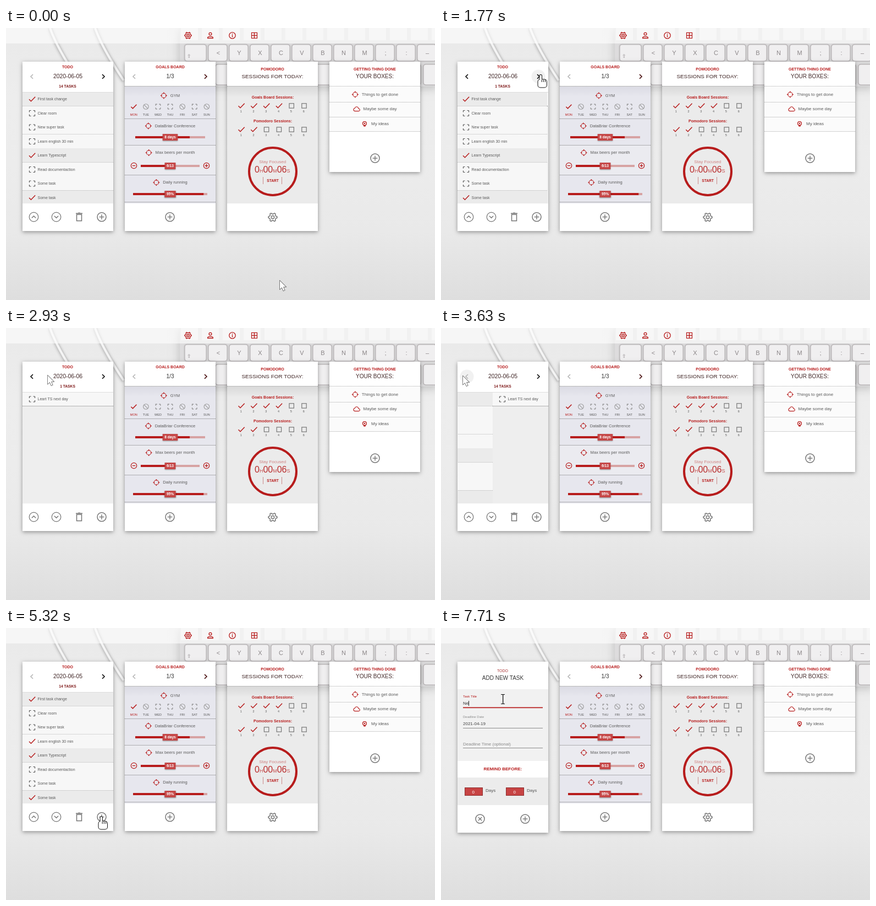
An HTML page with a canvas that plays this animation: 780 by 493 pixels, repeating every 8 s.

```html
<!DOCTYPE html>
<html lang="en">
<head>
<meta charset="utf-8">
<title>Productivity board</title>
<style>
html, body { margin: 0; width: 100%; height: 100%; overflow: hidden; background: #e8e8e8; }
canvas { display: block; width: 780px; height: 493px; }
</style>
</head>
<body>
<canvas id="stage" width="780" height="493"></canvas>
<script>
const ctx = document.getElementById('stage').getContext('2d');
const LOOP = 8000, FORM_AT = 5540, NEXT_AT = 1690, BACK_AT = 3310, FOCUS_AT = 6320;
const RED = '#b71c1c', GREY = '#757575', DARK = '#333', TEXT = '#5a5a5a', FAINT = '#b8b8b8';
const FONT = '"Liberation Sans", Arial, sans-serif';

const clamp = v => Math.max(0, Math.min(1, v));
const easeInOut = p => p < .5 ? 4 * p ** 3 : 1 - (2 - 2 * p) ** 3 / 2;
const progress = (t, start, length) => easeInOut(clamp((t - start) / length));
const mix = (a, b, p) => a + (b - a) * p;

// ---- drawing helpers ----
function rect(x, y, w, h, color) {
  ctx.fillStyle = color;
  ctx.fillRect(x, y, w, h);
}
function box(x, y, r, color, width = 1.2) {
  ctx.strokeStyle = color;
  ctx.lineWidth = width;
  ctx.strokeRect(x - r, y - r, 2 * r, 2 * r);
}
function textWidth(str, size, weight = '') {
  ctx.font = `${weight} ${size}px ${FONT}`;
  return ctx.measureText(str).width;
}
function text(str, x, y, size, color = TEXT, align = 'left', weight = '') {
  ctx.font = `${weight} ${size}px ${FONT}`;
  ctx.fillStyle = color;
  ctx.textAlign = align;
  ctx.fillText(str, x, y);
}
const centered = (str, x, y, size, color, weight) => text(str, x, y, size, color, 'center', weight);

// points: x,y pairs relative to (x, y)
function line(x, y, points, color, width = 1.3, close = false) {
  ctx.beginPath();
  for (let i = 0; i < points.length; i += 2) ctx.lineTo(x + points[i], y + points[i + 1]);
  if (close) ctx.closePath();
  ctx.strokeStyle = color;
  ctx.lineWidth = width;
  ctx.stroke();
}
function ring(x, y, r, color, width = 1.3) {
  ctx.beginPath();
  ctx.arc(x, y, r, 0, Math.PI * 2);
  ctx.strokeStyle = color;
  ctx.lineWidth = width;
  ctx.stroke();
}
function disc(x, y, r, color) {
  ctx.beginPath();
  ctx.arc(x, y, r, 0, Math.PI * 2);
  ctx.fillStyle = color;
  ctx.fill();
}
function dotted(x, y, color = '#757575') {
  ctx.setLineDash([1, 1]);
  line(x, y + .5, [0, 0, 165, 0], color, 1);
  ctx.setLineDash([]);
}
function shadowed(blur, dy, alpha, draw) {
  ctx.save();
  ctx.shadowColor = `rgba(0,0,0,${alpha})`;
  ctx.shadowBlur = blur;
  ctx.shadowOffsetY = dy;
  draw();
  ctx.restore();
}
function fade(x, y, w, h, ...colors) {
  const g = ctx.createLinearGradient(0, y, 0, y + h);
  colors.forEach((c, i) => g.addColorStop(i / (colors.length - 1), c));
  rect(x, y, w, h, g);
}
const card = (x, h) => shadowed(7, 2, .38, () => rect(x, 61, 165, h, '#fff'));

// ---- icons ----
const check = (x, y, s = 1) => line(x, y, [-5.5 * s, .2, -2 * s, 3.7 * s, 5.7 * s, -4.2 * s], RED, 1.5);
const chevron = (x, y, dir, color) => line(x, y, [-2 * dir, -3.8, 2 * dir, 0, -2 * dir, 3.8], color, 1.6);
function plus(x, y, r, color) {
  line(x, y, [-r, 0, r, 0], color, 1.4);
  line(x, y, [0, -r, 0, r], color, 1.4);
}
function brackets(x, y, r, color) {
  ctx.setLineDash([r * .6, r * .8, r * .6, 0]);
  box(x, y, r, color);
  ctx.setLineDash([]);
}
function block(x, y) {
  ring(x, y, 4.8, '#9a9a9a', 1.1);
  line(x, y, [-3.3, -3.3, 3.3, 3.3], '#9a9a9a', 1.1);
}
function button(x, y, r = 8, color = GREY) {
  ring(x, y, r, color, r > 6 ? 1.5 : 1.2);
  plus(x, y, r * .55, color);
}
function arrowButton(x, y, dir) {
  ring(x, y, 8.3, GREY, 1.2);
  line(x, y, [-3.6, -1.8 * dir, 0, 1.8 * dir, 3.6, -1.8 * dir], GREY, 1.4);
}
function target(x, y) {
  ring(x, y, 4.2, RED, 1.1);
  for (let i = 0; i < 4; i++) {
    const c = Math.cos(i * Math.PI / 2), s = Math.sin(i * Math.PI / 2);
    line(x, y, [3.2 * c, 3.2 * s, 6 * c, 6 * s], RED, 1.2);
  }
}
function gear(x, y, r, color) {
  const pts = [];
  for (let i = 0; i < 24; i++) {
    const a = (i - .5) * Math.PI / 12, d = i % 4 < 2 ? r * .74 : r;
    pts.push(d * Math.sin(a), d * Math.cos(a));
  }
  line(x, y, pts, color, 1.5, true);
  ring(x, y, r * .34, color, 1.4);
}
function trash(x, y) {
  line(x, y, [-4.5, -4.5, -4.5, 7, 4.5, 7, 4.5, -4.5], GREY, 1.5, true);
  rect(x - 6, y - 7.2, 12, 1.5, GREY);
  rect(x - 2, y - 8, 4, 1, GREY);
}
function cloud(x, y) {
  ctx.beginPath();
  ctx.arc(x - 3, y + 1, 2.6, Math.PI * .5, Math.PI * 1.45);
  ctx.arc(x, y - .8, 3.4, Math.PI * 1.1, Math.PI * 1.9);
  ctx.arc(x + 3.6, y + 1.4, 2.2, Math.PI * 1.45, Math.PI * .5);
  ctx.closePath();
  ctx.strokeStyle = RED;
  ctx.lineWidth = 1.1;
  ctx.stroke();
}
function bulb(x, y) {
  ring(x, y - 1, 3.4, RED, 1.3);
  disc(x, y - 1, 1.3, RED);
  rect(x - 1.8, y + 2.2, 3.6, 2.3, RED);
}
function labelled(icon, label, cx, y, size) {
  const left = cx - (textWidth(label, size) + 18) / 2;
  icon(left + 6, y);
  text(label, left + 18, y + 2.2, size);
}

// ---- backdrop ----
function key(x, y, w, h, label = '') {
  shadowed(3, 0, .3, () => {
    ctx.beginPath();
    ctx.roundRect(x, y, w, h, 4);
    ctx.fillStyle = '#f0eff0';
    ctx.fill();
  });
  ctx.strokeStyle = '#b3aeb0';
  ctx.lineWidth = 1;
  ctx.stroke();
  centered(label, x + w / 2 + 1, y + h / 2 + 4, 11, '#8a8587');
}
function cable(x) {
  for (const [color, width] of [['#d4d4d4', 8], ['#f4f4f4', 4]]) {
    ctx.beginPath();
    ctx.moveTo(x, 0);
    ctx.quadraticCurveTo(x + 12, 35, x + 52, 95);
    ctx.strokeStyle = color;
    ctx.lineWidth = width;
    shadowed(5, 1, .12, () => ctx.stroke());
  }
}
function backdrop() {
  fade(0, 0, 780, 493, '#e9e9e9', '#ededed', '#ececec', '#e9e9e9', '#dedede');
  cable(80);
  cable(162);

  shadowed(16, 3, .2, () => rect(316, 0, 470, 106, '#dddcdd'));
  for (let i = 0; i < 13; i++) rect(318 + i * 38, 0, 31, 22, '#ececec');
  key(325, 30, 39, 30);
  text('⇧', 329, 54, 9, '#8a8587');
  [...'<YXCVBNM;:–'].forEach((c, i) => key(368 + i * 38, 30, 34, 30, c));
  key(325, 66, 50, 37);
  key(381, 66, 36, 37);
  key(424, 66, 284, 37);
  for (const x of [716, 759]) key(x, 66, 38, 37);
  rect(0, 0, 780, 28, 'rgba(255,255,255,.6)');

  gear(331, 13.5, 6, RED);
  ring(371.5, 10.8, 2.4, RED);
  line(371.5, 17.5, [-4.8, 1, -4.8, -.7, -2.5, -1.8, 2.5, -1.8, 4.8, -.7, 4.8, 1], RED, 1.3, true);
  ring(411.5, 13.5, 5.7, RED);
  rect(410.8, 12.6, 1.4, 4, RED);
  rect(410.8, 10.2, 1.4, 1.5, RED);
  box(451.5, 13.5, 5, RED);
  plus(451.5, 13.5, 5, RED);
}

// ---- todo card ----
// a leading * marks a finished task
const tasks = ['*First task change', 'Clear room', 'New super task', 'Learn english 30 min',
  '*Learn Typescript', 'Read documentaction', 'Some task', '*Some task'];
const TOGGLED = 3;

function row(x, i, label, ticked) {
  const y = 116 + i * 25.5, finished = label[0] === '*';
  rect(x, y, 165, 25.5, finished ? '#ebebeb' : '#f7f7f7');
  dotted(x, Math.round(y + 25));
  if (finished || ticked) check(x + 17.5, y + 13); else brackets(x + 17.5, y + 13, 5, '#555');
  text(label.replace('*', ''), x + 27.5, y + 15.2, 7);
}
function dayArrow(x, dir, color, [px, py]) {
  if (Math.abs(px - x) < 12 && Math.abs(py - 84) < 10) disc(x, 88, 12.5, '#f1f1f1');
  chevron(x, 88, dir, color);
}
function todo(t, at) {
  const next = t >= NEXT_AT && t < BACK_AT;
  const slide = progress(t, NEXT_AT - 15, 700) - progress(t, BACK_AT, 700);
  const shift = Math.round(slide * 165);
  card(30, 307);
  centered('TODO', 112, 73, 7, RED, 'bold');
  centered(next ? '2020-06-06' : '2020-06-05', 112.5, 91, 10.4, '#402626');
  centered(next ? '1 TASKS' : '14 TASKS', 112, 108, 6.7, '#7d1717', 'bold');
  dayArrow(47, -1, next ? '#111' : FAINT, at);
  dayArrow(177, 1, '#111', at);

  ctx.save();
  ctx.beginPath();
  ctx.rect(30, 116, 165, 202);
  ctx.clip();
  tasks.forEach((label, i) => row(30 - shift, i, label, i === TOGGLED && t >= 4450));
  rect(195 - shift, 116, 165, 202, '#eeeeee');
  row(195 - shift, 0, 'Leart TS next day', false);
  ctx.restore();
  rect(30, 116, 165, 1, '#dedede');

  arrowButton(50.5, 342.5, -1);
  arrowButton(91.5, 342.5, 1);
  trash(133, 342.5);
  button(174, 342.5);
}

// ---- new task form ----
function field(y, label) {
  text(label, 40, y - 4, 8, '#8a8a8a');
  rect(40, y, 145, 1, '#8c8c8c');
}
function form(t, [, py]) {
  const focus = progress(t, FOCUS_AT, 330);
  card(30, 310);
  centered('TODO', 112, 80, 7, '#a33');
  centered('ADD NEW TASK', 112.5, 94, 10, DARK);
  rect(30, 111, 165, 130, '#f1f1f1');
  rect(30, 271, 165, 50, '#ececec');

  text('Task Title', 40, 139 - 13 * focus, 8 - 2 * focus, focus > .3 ? RED : '#8a8a8a');
  rect(40, 144, 145, 1, Math.abs(py - 136) < 20 ? '#4a4a4a' : '#8c8c8c');
  rect(112.5 - 72.5 * focus, 143.5, 145 * focus, 1.7, RED);
  text('Deadline Date', 40, 163, 6, '#8a8a8a');
  text('2021-04-19', 40, 176, 8, '#444');
  field(181, '');
  field(217, 'Deadline Time (optional)');

  centered('REMIND BEFORE:', 112.3, 258, 8, RED, 'bold');
  for (const x of [43, 118]) {
    rect(x, 289, 33, 15, '#8e3030');
    rect(x + 1, 290, 31, 13, '#c74444');
    text('0', x + 7.5 + 6 * Math.round(focus), 299.5, 8, '#fff');
    text('Days', x + 38, 297, 8, '#555');
  }
  ctx.save();
  ctx.translate(71, 346);
  ctx.rotate(Math.PI / 4);
  button(0, 0);
  ctx.restore();
  button(153, 346);

  const typed = 'Ne'.slice(0, Math.max(0, Math.floor((t - 7410) / 150)));
  text(typed, 40, 139, 8, DARK);
  const blinkOn = Math.floor((t - 6420) / 530) % 2 === 0;
  if (t > 6420 && (blinkOn || typed)) rect(40 + Math.round(textWidth(typed, 8)), 132, 1, 9, '#222');
}

// ---- other cards ----
function bar(y, w, part, label) {
  const cx = 298.5, badge = textWidth(label, 6.6, 'bold') + 7;
  rect(cx - w / 2, y - 2, w, 4, '#d7a3a3');
  rect(cx - w / 2, y - 2, w * part, 4, RED);
  shadowed(2, 1, .4, () => rect(cx - badge / 2, y - 6, badge, 12, '#c64848'));
  centered(label, cx, y + 2.3, 6.6, '#fff', 'bold');
}
function goals() {
  card(216, 307);
  centered('GOALS BOARD', 298.5, 73, 7, RED, 'bold');
  centered('1/3', 298.5, 91, 10, DARK);
  chevron(233, 88, -1, FAINT);
  chevron(363, 88, 1, '#4a1111');
  rect(216, 106, 165, 212, '#e7e7ee');
  rect(216, 213, 165, 53, '#ebebf0');
  fade(216, 106, 165, 18, 'rgba(60,60,90,.07)', 'rgba(60,60,90,0)');
  for (const y of [105, 164, 212, 266, 315]) dotted(216, y);

  labelled(target, 'GYM', 298.5, 122.5, 7.6);
  labelled(target, 'DataBriar Conference', 298.5, 177.5, 7.6);
  labelled(target, 'Max beers per month', 298.5, 226, 7.6);
  labelled(target, 'Daily running', 298.5, 280, 7.6);

  ['MON', 'TUE', 'WED', 'THU', 'FRI', 'SAT', 'SUN'].forEach((day, i) => {
    const x = 232.3 + i * 22.1;
    if (i === 0) check(x, 142.5, .9);
    else if ('TUE FRI SUN'.includes(day)) block(x, 142.5);
    else brackets(x, 142.5, 4.3, '#8a8a8a');
    centered(day, x, 159, 5.6, i ? '#555' : RED);
  });

  bar(198, 127, .78, '8 days');
  bar(250, 107, 6 / 13, '6/13');
  bar(301, 135, .95, '95%');
  ring(232.5, 249.5, 5.2, RED, 1.2);
  line(232.5, 249.5, [-2.8, 0, 2.8, 0], RED);
  button(364.5, 249.5, 5.2, RED);
  button(298, 342.5);
}

function sessions(title, y, done) {
  centered(title, 485, y, 7, RED, 'bold');
  for (let i = 0; i < 6; i++) {
    const x = 428 + i * 22.8;
    if (i < done) check(x, y + 13); else box(x, y + 13, 4.2, '#777');
    centered(i + 1, x - .8, y + 25.3, 5.5, '#555');
  }
}
function pomodoro() {
  card(402, 307);
  centered('POMODORO', 484.5, 77, 7, RED, 'bold');
  centered('SESSIONS FOR TODAY:', 484.5, 91, 9.9, '#402626');
  rect(402, 106, 165, 212, '#ebebeb');
  fade(402, 106, 165, 20, 'rgba(0,0,0,.08)', 'rgba(0,0,0,0)');
  dotted(402, 105);
  sessions('Goals Board Sessions:', 128, 4);
  sessions('Pomodoro Sessions:', 171, 2);

  ring(485, 260, 43, RED, 4);
  centered('Stay Focused', 484.7, 245, 8, '#cf8080');
  let x = 452;
  for (const c of '0H00M06S') {
    const size = c >= 'A' ? 9 : 16;
    text(c, x, 262, size, size > 9 ? '#b92a2a' : '#c65050');
    x += textWidth(c, size);
  }
  centered('START', 485, 279, 6.6, RED, 'bold');
  for (const bx of [467, 501]) rect(bx, 270, 1, 13, '#c98a8a');
  gear(485, 343, 8, GREY);
}

function boxes() {
  card(588, 200);
  centered('GETTING THING DONE', 670.5, 77, 7, RED, 'bold');
  centered('YOUR BOXES:', 670.5, 91, 10, '#402626');
  rect(588, 106, 165, 82, '#fbfbfb');
  for (const y of [105, 134, 161, 187]) dotted(588, y, '#a8a8a8');
  labelled(target, 'Things to get done', 671, 120.5, 8);
  labelled(cloud, 'Maybe some day', 671, 147, 8);
  labelled(bulb, 'My ideas', 671, 174, 8);
  button(671, 236);
}

// ---- pointer ----
// each move: start, length, end point
const moves = [
  [300, 150, 491, 468], [620, 680, 180, 94], [1450, 90, 181, 85], [2540, 650, 40, 87],
  [4250, 200, 48, 207], [4700, 300, 62, 288], [5030, 330, 174, 342], [5560, 450, 93, 138],
  [FOCUS_AT - 220, 300, 112, 129]
];
function pointerAt(t) {
  let x = 498, y = 458;
  for (const [start, length, toX, toY] of moves) {
    const p = progress(t, start, length);
    x = mix(x, toX, p);
    y = mix(y, toY, p);
  }
  return [Math.round(x), Math.round(y)];
}
function hand(x, y) {
  ctx.beginPath();
  ctx.roundRect(x - 1.5, y, 3.5, 16, 1.7);
  ctx.roundRect(x - 4.5, y + 8.5, 15.5, 14, 4);
  ctx.strokeStyle = '#111';
  ctx.lineWidth = 2;
  ctx.stroke();
  ctx.fillStyle = '#fff';
  ctx.fill();
  for (let i = 0; i < 3; i++) rect(x + 1.7 + i * 3.2, y + 9, 1, 4, '#111');
}
function arrow(x, y) {
  line(x, y, [0, 0, 0, 15.5, 3.6, 12.2, 6.3, 18.3, 8.8, 17.2, 6.2, 11.2, 11, 11], '#222', 1.1, true);
  ctx.fillStyle = '#fff';
  ctx.fill();
}
function beam(x, y) {
  rect(x, y - 8, 1.3, 16, '#111');
  for (const dy of [-9, 8]) rect(x - 3, y + dy, 7, 1, '#111');
}
function pointer(t, [x, y]) {
  const onArrow = cx => Math.abs(x - cx) < 14 && Math.abs(y - 84) < 14;
  const canGoBack = t >= NEXT_AT && t < BACK_AT;
  const clickable = x < 195 && y > 116 || onArrow(177) || canGoBack && onArrow(47);
  if (t >= FORM_AT && y < 220) beam(x, y);
  else if (t < FORM_AT && clickable) hand(x, y);
  else arrow(x, y);
}

function render(now) {
  const t = now % LOOP, at = pointerAt(t);
  backdrop();
  (t < FORM_AT ? todo : form)(t, at);
  goals();
  pomodoro();
  boxes();
  pointer(t, at);
}

const start = performance.now();
function tick() {
  render(performance.now() - start);
  requestAnimationFrame(tick);
}
tick();
</script>
</body>
</html>
```
